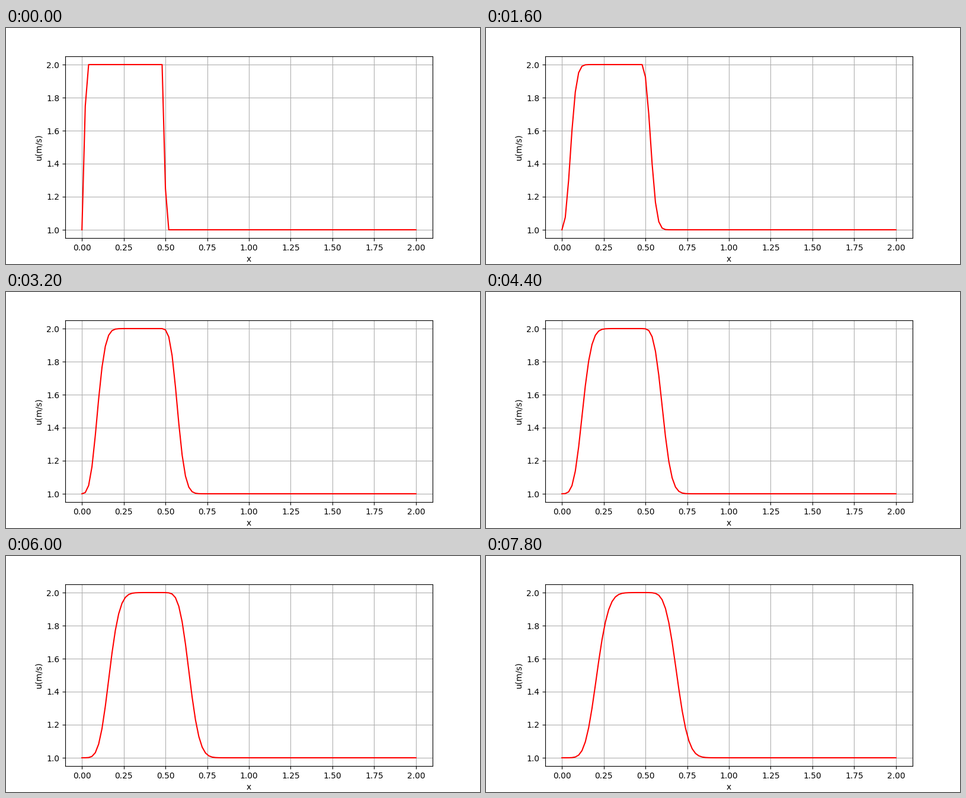
These frames come from a looping animation (800x400 px, 8 s). A matplotlib script:

```python
import numpy as np
import matplotlib.pyplot as plt
from matplotlib.animation import FuncAnimation

FRAMES = 40
COURANT = 0.25          # c * dt / dx
NX = 101

x = np.linspace(0, 2, NX)


def solve(steps):
    """Square pulse carried to the right by a first-order upwind scheme."""
    u = np.ones(NX)
    u[1:25] = 2
    for _ in range(steps):
        u[1:] -= COURANT * (u[1:] - u[:-1])
    return u


fig, ax = plt.subplots(figsize=(8, 4), dpi=100)
line, = ax.plot(x, solve(1), color="red", lw=1.5)
ax.set_xlim(-0.1, 2.1)
ax.set_ylim(0.95, 2.05)
ax.set_xlabel("x")
ax.set_ylabel("u(m/s)")
ax.grid(True)


def update(frame):
    line.set_ydata(solve(frame + 1))
    return line,


anim = FuncAnimation(fig, update, frames=FRAMES, interval=200,
                     repeat=True, repeat_delay=0)
plt.show()
```
